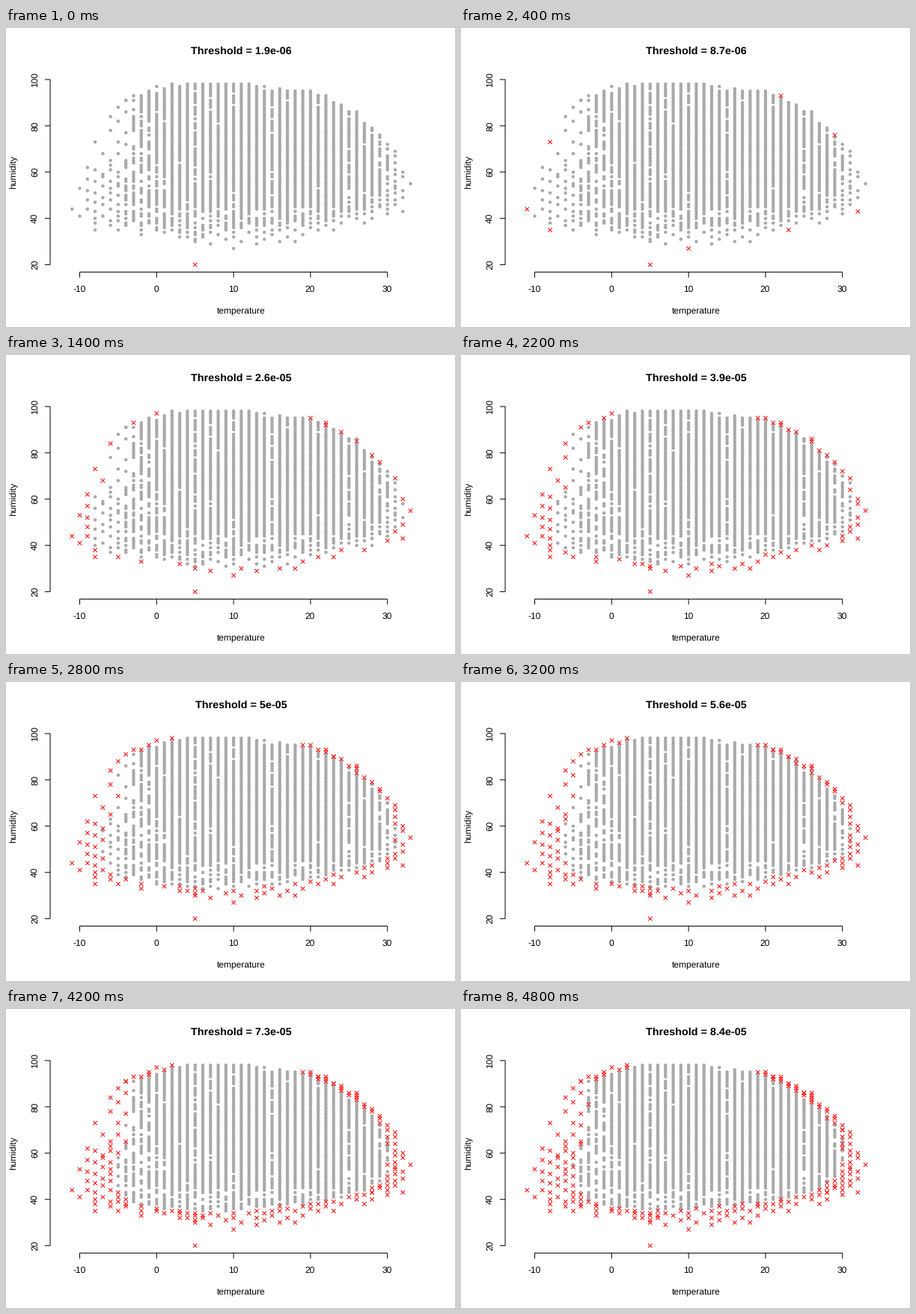
A matplotlib script that plays this animation: 600 px wide and 400 px high, repeating every 5000 ms.

```python
import random

import matplotlib.pyplot as plt
import numpy as np
from matplotlib.animation import FuncAnimation
from matplotlib.collections import LineCollection
from matplotlib.path import Path

WIDTH, HEIGHT, DPI = 600, 400, 100
FRAMES, INTERVAL = 25, 200
PX = 72 / DPI  # points per pixel
LEFT, BOTTOM = 59.04, 326.56
ANOMALIES = 210
GOLDEN = (5 ** 0.5 - 1) / 2

plt.rcParams["font.family"] = "Liberation Sans"
plt.rcParams["text.hinting"] = "none"

# Rim of the cloud as (temperature, humidity): flagging starts at the outer
# side and has reached the inner side when the loop ends.
OUTER = np.array([(1, 100), (-7, 89), (-10, 63), (-11, 55), (-11, 46), (-12, 39),
                  (-8, 34), (3, 30), (6, 27), (13, 26), (17, 27), (22, 35),
                  (29, 37), (33, 45), (34, 55), (31, 70), (26, 87), (22, 94), (18, 97)])
INNER = np.array([(4, 98), (-3, 91), (-3, 68), (-5, 58), (-5, 50), (-4, 42),
                  (-2, 38), (3, 36), (7, 35), (13, 37), (17, 38), (22, 40),
                  (27, 45), (29, 48), (30, 55), (30, 68), (27, 80), (24, 87), (20, 94)])


def to_x(temperature):
    return LEFT + (temperature + 13.84) * 10.2802


def to_y(humidity):
    return BOTTOM - (humidity - 16.8) * 3.0963


def along(rim, position):
    steps = np.arange(len(rim))
    return np.array([np.interp(position, steps, axis) for axis in rim.T])


def make_anomalies():
    """Readings outside the core, the rarest first."""
    points = [(5, 20)]
    for i in range(1, ANOMALIES):
        position = i * GOLDEN % 1 * (len(OUTER) - 1)
        depth = (i / ANOMALIES) ** 0.6
        outer, inner = along(OUTER, position), along(INNER, position)
        t, h = np.rint(outer + (inner - outer) * depth)
        points.append((int(t), int(h)))
    return points


def make_core(taken):
    """Columns of whole-degree readings, thinner at the cold and hot ends."""
    rng = random.Random(7)
    region = Path(np.vstack([INNER, (11, 98.6)]))
    points = []
    for t in range(-5, 31):
        fill = min(0.98, 0.45 + 0.1 * (t + 4), 0.25 * (32 - t))
        if t % 10 == 5:
            fill *= 0.8
        for h in range(34, 100):
            chance = fill * (0.8 if h < 45 else 1)
            if (rng.random() < chance and (t, h) not in taken
                    and region.contains_point((t, h))):
                points.append((t, h))
    return points


anomalies = make_anomalies()
core = make_core(set(anomalies))

fig = plt.figure(figsize=(WIDTH / DPI, HEIGHT / DPI), dpi=DPI, facecolor="white")
ax = fig.add_axes([0, 0, 1, 1])
ax.set(xlim=(0, WIDTH), ylim=(HEIGHT, 0))
ax.axis("off")


def line(xs, ys):
    ax.plot(xs, ys, color="black", lw=PX, solid_capstyle="butt", snap=False)


def label(x, y, text, size=12, **style):
    return ax.text(x, y, text, fontsize=size * PX, ha="center", va="baseline",
                   rotation_mode="anchor", **style)


line([to_x(-10), to_x(30)], [BOTTOM, BOTTOM])
for t in range(-10, 31, 10):
    line([to_x(t)] * 2, [BOTTOM, BOTTOM + 7.2])
    label(to_x(t) - 0.5, 353, str(t))

line([LEFT, LEFT], [to_y(20), to_y(100)])
for h in range(20, 101, 20):
    line([LEFT - 7.2, LEFT], [to_y(h)] * 2)
    label(42, to_y(h), str(h), rotation=90)

label(314.4, 382.4, "temperature")
label(14, 192.8, "humidity", rotation=90)
title = label(314.4, 35, "", 14.4, weight="bold")


def strokes(color, width, **style):
    marks = LineCollection([], colors=color, linewidths=width * PX, **style)
    marks.set_snap(False)
    return ax.add_collection(marks, autolim=False)


dots = strokes("#a9a9a9", 4.6, capstyle="round", zorder=2)
crosses = strokes("red", 1, zorder=3)


def dot(t, h):
    x, y = to_x(t), to_y(h)
    return [(x - 0.01, y), (x + 0.01, y)]


def cross(t, h, r=2.7):
    x, y = to_x(t), to_y(h)
    return [[(x - r, y - r), (x + r, y + r)], [(x - r, y + r), (x + r, y - r)]]


def update(frame):
    flagged = max(1, round(ANOMALIES * (frame / (FRAMES - 1)) ** 1.25))
    red = anomalies[:flagged]
    gray = core + [p for p in anomalies[flagged:] if p not in red]
    dots.set_segments([dot(*p) for p in gray])
    crosses.set_segments([stroke for p in red for stroke in cross(*p)])
    title.set_text(f"Threshold = {1.9e-6 + 3.405e-6 * frame:.2g}")
    return dots, crosses, title


anim = FuncAnimation(fig, update, frames=FRAMES, interval=INTERVAL,
                     repeat=True, repeat_delay=0)
plt.show()
```
